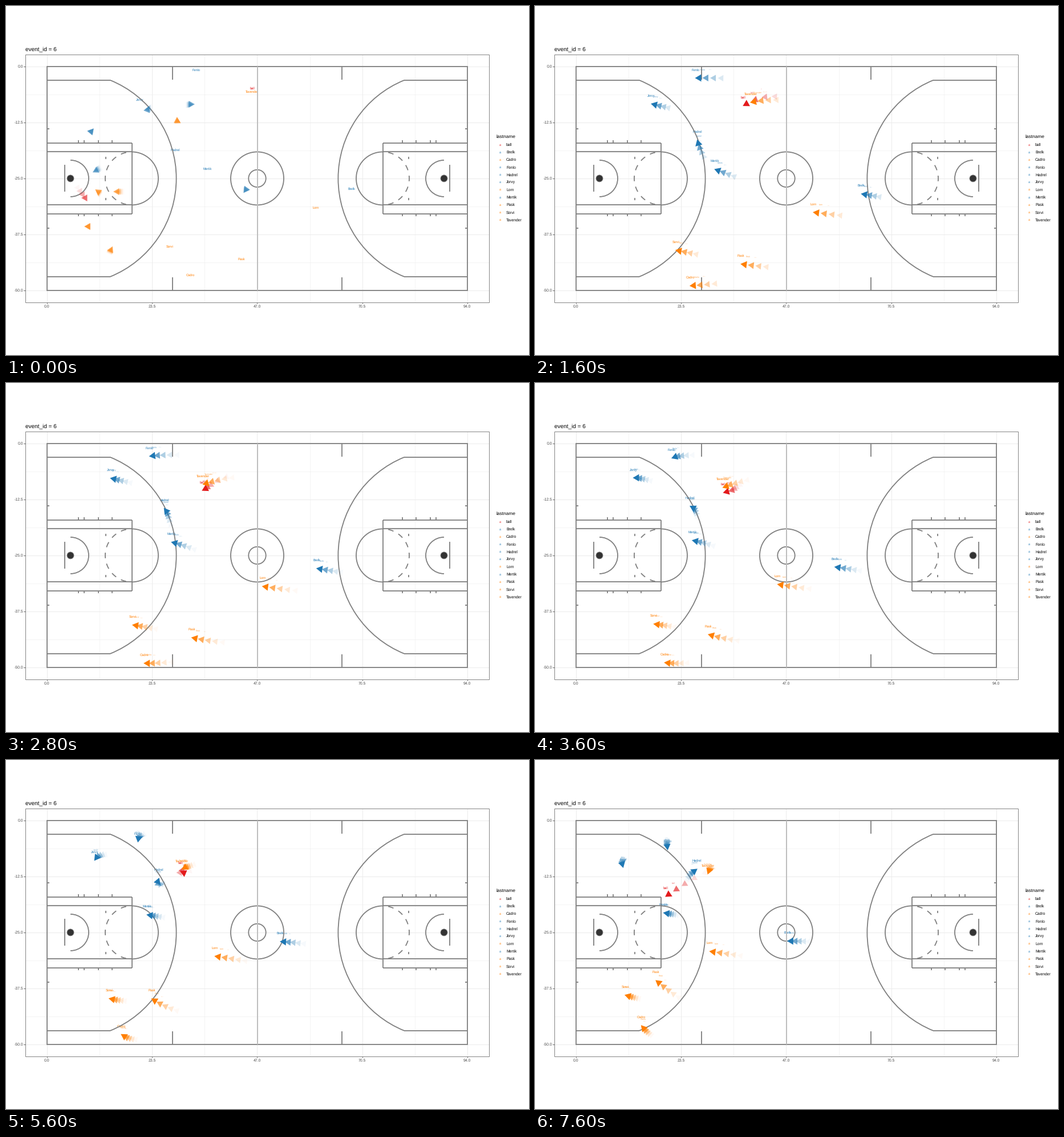
These frames come from a looping animation (917 by 611 pixels, 8000 ms). A matplotlib script:

```python
import matplotlib.pyplot as plt
import numpy as np
from matplotlib.animation import FuncAnimation
from matplotlib.patches import Arc, Circle, Polygon, Rectangle

W, H, DPI = 917, 611, 100
FRAMES, STEP_MS = 20, 400
PT = 72 / DPI  # points per pixel
RED, BLUE, ORANGE = "#e31a1c", "#1f78b4", "#ff7f00"
COURT, DARK, AXIS_TEXT = "#7f7f7f", "#333333", "#4d4d4d"
WAKE = [(1 - age / 5) ** 2 for age in range(5)]
HEAD_RADIUS, HEAD_STROKE = 6.24, 1.07
LABEL_SIZE, LABEL_LIFT = 5.69, 12.6

plt.rcParams["font.family"] = "Liberation Sans"
plt.rcParams["text.hinting"] = "none"

fig = plt.figure(figsize=(W / DPI, H / DPI), dpi=DPI, facecolor="white")
ax = fig.add_axes([0, 0, 1, 1])
ax.set(xlim=(0, W), ylim=(H, 0))
ax.axis("off")


# ---------- drawing helpers (pixel coordinates, y down) ----------
def line(xs, ys, color=COURT, width=1.8, z=3, **kw):
    ax.plot(xs, ys, color=color, lw=width * PT, zorder=z,
            solid_capstyle="butt", **kw)


def arc(cx, cy, r, start, stop):
    ax.add_patch(Arc((cx, cy), 2 * r, 2 * r, theta1=start, theta2=stop,
                     color=COURT, lw=1.8 * PT, zorder=3))


def text(x, y, s, size, color="black", ha="left", z=6, **kw):
    return ax.text(x, y, s, fontsize=size * PT, color=color, ha=ha,
                   va="baseline", zorder=z, **kw)


def px(feet):
    return 71.9 + 7.84 * feet


def py(feet):
    return 105.9 - 7.84 * feet


# ---------- static parts ----------
def draw_panel():
    left, right, top, bottom = 34, 847, 85.4, 518.5
    for i in range(9):
        major = i % 2 == 0
        width = 1.0 if major else 0.5
        x, y = px(11.75 * i), py(-6.25 * i)
        line([x, x], [top, bottom], "#ebebeb", width, 0)
        line([left, right], [y, y], "#ebebeb", width, 0)
        if major:
            line([x, x], [bottom, bottom + 2.8], DARK, 0.8)
            line([left - 2.8, left], [y, y], DARK, 0.8)
            text(x, bottom + 9.6, f"{11.75 * i:.1f}", 6.9, AXIS_TEXT, "center")
            text(30, y + 2.5, f"{-6.25 * i or 0:.1f}", 6.9, AXIS_TEXT, "right")
    ax.add_patch(Rectangle((left, top), right - left, bottom - top, fill=False,
                           ec="#858585", lw=1 * PT, zorder=5))
    text(33.8, 78.9, "event_id = 6", 10)


def draw_half(mirrored):
    def fx(x):
        return 881 - x if mirrored else x

    def hline(x0, x1, y):
        line([fx(x0), fx(x1)], [y, y])

    def vline(x, y0, y1):
        line([fx(x), fx(x)], [y0, y1])

    def side_arc(cx, r, start, stop):
        if mirrored:
            start, stop = 180 - stop, 180 - start
        arc(fx(cx), mid, r, start, stop)

    mid = 301.9
    for side in (-1, 1):
        hline(72, 183, mid + side * 172)
        hline(72, 220.5, mid + side * 62)
        hline(72, 220.5, mid + side * 46.5)
        hline(72, 76, mid + side * 87)
        vline(292.3, mid + side * 196, mid + side * 172.7)
        vline(174.6, mid + side * 33.8, mid + side * 38.2)
        for x in (127.4, 136.8, 161.6, 186.2):
            vline(x, mid + side * 62, mid + side * 66.5)
    vline(220.5, mid - 62, mid + 62)
    vline(102.9, 278.3, 325.4)
    side_arc(113, 185.6, -67.9, 67.9)
    side_arc(113, 32, -90, 90)
    side_arc(220.5, 46.5, -90, 90)
    for k in range(7):
        side_arc(220.5, 46.5, 102 + 24 * k, 114 + 24 * k)
    ax.add_patch(Circle((fx(113), mid), 6, fc=DARK, ec=COURT,
                        lw=0.8 * PT, zorder=3))


def draw_court():
    ax.add_patch(Rectangle((72, 105.7), 737.2, 392.3, fill=False, ec=COURT,
                           lw=1.8 * PT, zorder=3))
    for r in (46.5, 15.2):
        arc(440.5, 301.9, r, 0, 360)
    draw_half(False)
    draw_half(True)
    line([440.5, 440.5], [106, 498], "#bebebe", 2)


# ---------- motion ----------
def spline(knots, values):
    """Natural cubic spline through the knots, sampled at every frame."""
    t, v = np.array(knots, float), np.array(values, float)
    h, n = np.diff(t), len(t)
    a, b = np.eye(n), np.zeros(n)
    for i in range(1, n - 1):
        a[i, i - 1:i + 2] = h[i - 1], 2 * (h[i - 1] + h[i]), h[i]
        b[i] = 6 * ((v[i + 1] - v[i]) / h[i] - (v[i] - v[i - 1]) / h[i - 1])
    m = np.linalg.solve(a, b)
    at = np.arange(FRAMES)
    i = np.clip(np.searchsorted(t, at, side="right") - 1, 0, n - 2)
    lo, hi, s = at - t[i], t[i + 1] - at, h[i]
    return ((m[i] * hi ** 3 + m[i + 1] * lo ** 3) / (6 * s)
            + (v[i] / s - m[i] * s / 6) * hi
            + (v[i + 1] / s - m[i + 1] * s / 6) * lo)


COARSE = (0, 5, 12, 19)
FINE = (0, 2, 5, 9, 12, 16, 19)
DRIBBLE = (0, 2, 5, 9, 11, 12, 13, 14, 15, 16, 19)


class Mover:
    def __init__(self, name, color, knots, xs, ys):
        self.name, self.color = name, color
        self.path = np.column_stack([spline(knots, xs), spline(knots, ys)])


MOVERS = [
    Mover("ball", RED, DRIBBLE,
          (432, 397.5, 354, 330.5, 306, 308.5, 313, 306, 292, 274, 229),
          (159, 160, 182, 192, 196, 192, 198, 195, 199.5, 210, 239)),
    Mover("Brelk", BLUE, COARSE, (606, 563.5, 498, 443),
          (334.5, 327.5, 319, 317)),
    Mover("Cadro", ORANGE, COARSE, (323, 261, 210.5, 186.5),
          (485.5, 490.5, 485, 465)),
    Mover("Fenlo", BLUE, FINE, (334, 307.5, 270, 240, 232.5, 231.5, 232.5),
          (126.5, 126, 126.5, 131.5, 139, 148, 157)),
    Mover("Hadrel", BLUE, FINE, (297, 289.5, 282.5, 272, 267, 273, 284),
          (266.5, 250.5, 228, 215.5, 212.5, 200, 191)),
    Mover("Jorvy", BLUE, FINE, (235, 220, 196.5, 172.5, 160, 153.5, 154.5),
          (178.5, 175, 169.5, 166, 170.5, 181, 188)),
    Mover("Lorn", ORANGE, COARSE, (543, 475, 390, 306.5),
          (367.5, 359.5, 347, 335)),
    Mover("Mertik", BLUE, COARSE, (353, 306.5, 257.5, 225.5),
          (300, 283, 272.5, 267.5)),
    Mover("Pask", ORANGE, COARSE, (413, 349, 274, 212),
          (457.5, 450, 428.5, 386)),
    Mover("Sorvi", ORANGE, COARSE, (287, 238, 191, 158),
          (435.5, 426, 419.5, 411.5)),
    Mover("Tavender", ORANGE, FINE, (431, 404, 366, 329.5, 314, 305.5, 303),
          (164.5, 165, 171.5, 183, 188.5, 194, 199.5)),
]

# Heads left from the play before: color, centre, heading, drift per step back
LEFTOVERS = [
    (RED, 139, 336, 180, -4.5, -6),
    (BLUE, 248, 182, 172, 1.5, -1.5),
    (BLUE, 324, 172, 0, -2, 0.5),
    (BLUE, 149, 220, 190, 0.5, -0.5),
    (BLUE, 158, 288, -88, 2, -1.5),
    (BLUE, 421, 321, 5, -0.7, 0.7),
    (ORANGE, 300, 201, -92, 0.5, 0.8),
    (ORANGE, 162, 325, 95, 0.6, 1.5),
    (ORANGE, 195, 325, 180, 3, 0),
    (ORANGE, 144, 386, 180, 0.5, 0),
    (ORANGE, 184, 427, 175, -0.7, 1.5),
]


def draw_legend():
    text(859.6, 230.6, "lastname", 8.4)
    dotted = {1, 2, 5, 8, 9}
    for i, mover in enumerate(MOVERS):
        y = 242.6 + 13.15 * i
        text(866.5, y + 1.9, "a", 5.7, mover.color, "center", alpha=0.85)
        if i in dotted:
            text(871.3, y + 0.3, ".", 5, mover.color, "center", alpha=0.8)
        text(877, y + 2.5, mover.name, 6.8)


moving = []


def add_head(center, angle, color, weight, z):
    turns = angle + np.radians([0, 120, 240])
    radius = HEAD_RADIUS + HEAD_STROKE * weight
    points = np.column_stack([np.cos(turns), np.sin(turns)]) * radius + center
    moving.append(ax.add_patch(Polygon(points, fc=color, ec="none",
                                       alpha=weight, zorder=z)))


def add_mover(mover, frame, weight):
    tip = mover.path[frame]
    if frame > 0:
        dx, dy = tip - mover.path[frame - 1]
        angle = np.arctan2(dy, dx)
        heading = np.array([np.cos(angle), np.sin(angle)])
        add_head(tip - HEAD_RADIUS * heading, angle, mover.color, weight, 4)
    if weight > 0.3:
        size = LABEL_SIZE * weight
        baseline = tip[1] - LABEL_LIFT - 0.36 * (LABEL_SIZE - size)
        moving.append(text(tip[0], baseline, mover.name, size, mover.color,
                           "center", 2, alpha=weight))


def update(frame):
    for artist in moving:
        artist.remove()
    moving.clear()
    for age in reversed(range(5)):
        then = frame - age
        if then >= 0:
            for mover in MOVERS:
                add_mover(mover, then, WAKE[age])
        else:
            back = -1 - then
            for color, x, y, degrees, dx, dy in LEFTOVERS:
                add_head((x + back * dx, y + back * dy), np.radians(degrees),
                         color, WAKE[age], 4)
    return moving


draw_panel()
draw_court()
draw_legend()
anim = FuncAnimation(fig, update, frames=FRAMES, interval=STEP_MS,
                     init_func=lambda: [], repeat=True, repeat_delay=0)
plt.show()
```
